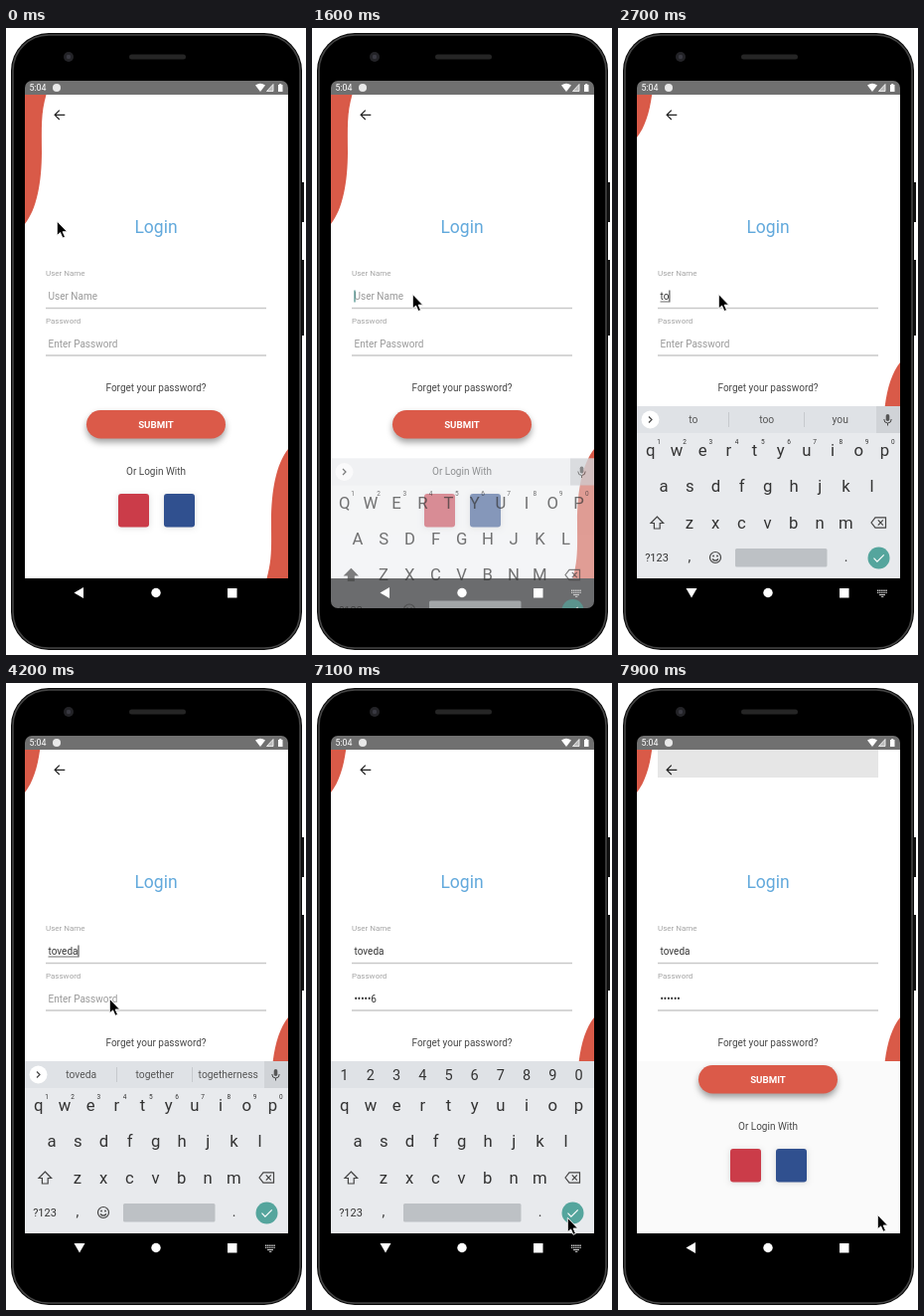
Write an HTML page that moves like this. It is 302x630 px and loops after 8000 ms.

```html
<!DOCTYPE html>
<html lang="en">
<head>
<meta charset="utf-8">
<title>Login form</title>
<style>
html, body { margin: 0; width: 100%; height: 100%; overflow: hidden; background: #fff; }
svg { display: block; width: 302px; height: 630px; font-family: Roboto, sans-serif; }
.mid { text-anchor: middle; }
.line { fill: none; stroke: #444; stroke-width: 1.2; }
</style>
</head>
<body>
<svg viewBox="0 0 302 630">
  <defs>
    <clipPath id="screen"><rect x="19" y="53" width="265" height="530" rx="7"/></clipPath>
    <clipPath id="pageClip"><rect id="pageBox" x="19" y="67" width="265" height="486"/></clipPath>
    <clipPath id="keysClip"><rect id="keysBox" x="19" y="380" width="265" height="203"/></clipPath>
    <filter id="soft" x="-30%" y="-50%" width="160%" height="220%"><feGaussianBlur stdDeviation="3"/></filter>
    <path id="blob" d="M19 67H40.5C35 86 36 100 36 124C36 155 31 182 19 197Z" fill="#d95a48"/>
  </defs>

  <!-- phone -->
  <path d="M296 155h4v40h-4zM296 233h4v76h-4z" fill="#111"/>
  <rect x="5" y="5" width="293" height="620" rx="38" fill="#0a0a0a"/>
  <rect x="7" y="7" width="289" height="616" rx="36" fill="#000" stroke="#444" stroke-width="1.6"/>
  <circle cx="63" cy="29" r="5" fill="#232327"/><circle cx="63" cy="29" r="2.2" fill="#3a3a42"/>
  <rect x="124" y="26.5" width="57" height="5" rx="2.5" fill="#252525"/>

  <g clip-path="url(#screen)">
    <!-- page -->
    <rect x="19" y="67" width="265" height="486" fill="#fafafa"/>
    <rect id="paper" x="19" y="67" width="265" height="486" fill="#fff"/>
    <rect x="19" y="53" width="265" height="14" fill="#707070"/>
    <text x="23.5" y="63" font-size="8.8" fill="#fff">5:04</text>
    <circle cx="51" cy="60" r="4" fill="#e8e8e8"/>
    <path d="M251 57.5q5-3.5 10 0l-5 6.5z" fill="#fff"/>
    <path d="M269 56.5v7h-6.5z" fill="#bbb" stroke="#fff" stroke-width=".8"/>
    <path d="M274 57h1.2v-1h2v1h1.3v7H274z" fill="#fff"/>
    <g clip-path="url(#pageClip)">
      <use id="blobA" href="#blob"/>
      <use id="blobB" href="#blob"/>
    </g>
    <rect id="focus" x="40" y="67" width="222" height="28" fill="#e6e6e6"/>
    <path d="M59.3 87.3H49.3M53.8 82.6L49.1 87.3L53.8 92" class="line" style="stroke:#222"/>
    <text x="151" y="205.5" font-size="17.5" fill="#62a9dc" class="mid">Login</text>
    <g font-size="8" fill="#a5a5a5"><text x="40" y="249">User Name</text><text x="40" y="297">Password</text></g>
    <path d="M40 281.5H262M40 329H262" stroke="#c9c9c9" stroke-width="1.3"/>
    <g font-size="10"><text id="user" x="42.5" y="273"/><text id="pass" x="42.5" y="320.5"/></g>
    <path id="under" stroke="#444" stroke-width=".8"/>
    <path id="caret" stroke-width="1.1"/>
    <g font-size="10" fill="#484848" class="mid">
      <text x="151" y="365">Forget your password?</text>
      <text x="151" y="449">Or Login With</text>
    </g>
    <g filter="url(#soft)">
      <rect x="81" y="387.5" width="140" height="29" rx="14.5" opacity=".36"/>
      <path d="M113 469h31v33h-31zM159 469h31v33h-31z" opacity=".14"/>
    </g>
    <rect x="81" y="384" width="140" height="28.5" rx="14.2" fill="#db5a49"/>
    <text x="151" y="401.7" font-size="9.7" font-weight="bold" fill="#fff" class="mid">SUBMIT</text>
    <rect x="113" y="468" width="31" height="33.5" rx="3" fill="#cb3c49"/>
    <rect x="159" y="468" width="31" height="33.5" rx="3" fill="#30508f"/>

    <!-- keyboard -->
    <g clip-path="url(#keysClip)">
      <g id="board">
        <g id="panel">
          <rect x="19" y="380" width="265" height="203" fill="#e8eaed"/>
          <rect x="19" y="380" width="265" height="27" fill="#dfe2e6"/>
        </g>
        <g id="keys"></g>
      </g>
    </g>
  </g>

  <!-- navigation bar -->
  <path id="back" fill="#fff"/>
  <circle cx="151" cy="567.5" r="4.7" fill="#fff"/>
  <rect x="223" y="563" width="9.5" height="9.5" fill="#fff"/>
  <g id="imeIcon" fill="none" stroke="#ccc">
    <path d="M261 565.2h10M261 567.4h10" stroke-width="1.4" stroke-dasharray="1.4 .7"/>
    <path d="M263 569.5h6" stroke-width="1.2"/><path d="M265 571.4h2.4" stroke-width="1"/>
  </g>

  <path id="mouse" d="M0 0V14.5L3.3 11.6L5.7 17L8.2 15.9L5.8 10.7H10.3Z" fill="#000" stroke="#fff" stroke-width=".9"/>
</svg>
<script>
const LOOP = 8000, STEP = 100;
const KEYS_IN = 1600, RESIZE = 1800, NEXT_FIELD = 4300, KEYS_OUT = 7900;
const NAME = 'toveda', DIGITS = '123456';
const nameTimes = [2400, 2700, 2900, 3000, 3100, 3200];
const digitTimes = [4900, 5300, 5700, 6000, 6200, 6400];
// time, x, y of the pointer tip
const track = [[0, 51.3, 194], [400, 51.3, 194], [1300, 101.3, 267.5], [3700, 101.3, 267.5], [4200, 104.3, 317.3],
  [4500, 105.3, 316.5], [6400, 105.3, 316.5], [7000, 257.3, 537.3], [7300, 257.3, 537.3], [7800, 261.3, 534.3], [8000, 261.3, 534.3]];

const el = id => document.getElementById(id);
const set = (id, attrs) => { for (const k in attrs) el(id).setAttribute(k, attrs[k]); };
const show = (id, on) => set(id, { visibility: on ? 'visible' : 'hidden' });
const count = (times, t) => times.filter(s => s <= t).length;

function pointer(t) {
  const i = Math.max(1, track.findIndex(p => p[0] > t));
  const [t0, x0, y0] = track[i - 1], [t1, x1, y1] = track[i];
  const p = (t - t0) / (t1 - t0), e = p * p * (3 - 2 * p);
  return [x0 + (x1 - x0) * e, y0 + (y1 - y0) * e];
}

const label = (s, x, y, size, fill = '#333') =>
  `<text class="mid" x="${x}" y="${y}" font-size="${size}" fill="${fill}">${s}</text>`;
const row = (chars, x, y, size, step = 26.2) =>
  [...chars].map((c, i) => label(c, x + i * step, y, size)).join('');

function hints(word) {
  if (!word) return ['', '', ''];
  if (word.length < 2) return [word, 'to', 'the'];
  if (word.length < 3) return [word, 'too', 'you'];
  return [word, 'together', 'togetherness'];
}

function strip(word) {
  const words = hints(word);
  return '<rect x="260" y="380" width="24" height="27" fill="#d0d3d7"/>' +
    '<circle cx="32.5" cy="393.5" r="9" fill="#fff"/><path d="M31 390.5l3 3l-3 3" class="line"/>' +
    (word ? '<path d="M111.5 386v15M187.5 386v15" stroke="#c6c9cd"/>' : '') +
    words.map((w, i) => label(w, 75.7 + 74 * i, 397.3, 10.3, '#555')).join('') +
    '<rect x="269.7" y="388" width="3.6" height="7" rx="1.8" fill="#555"/>' +
    '<path d="M267.8 393q0 4 3.7 4t3.7-4M271.5 397v2.5" class="line" style="stroke-width:1"/>';
}

function keyboard(word, secret) {
  const upper = !secret && !word;
  const letters = s => upper ? s.toUpperCase() : s;
  const left = secret ? 92 : 118;
  return (secret ? row('1234567890', 32.7, 399.3, 14.5) : strip(word) + row('1234567890', 41, 417.5, 6.5)) +
    row(letters('qwertyuiop'), 32.7, 430, 16.7) +
    row(letters('asdfghjkl'), 46, 466, 16.7) +
    row(letters('zxcvbnm'), 72, 502.5, 16.7) +
    `<path d="M39.3 491l6.3 6.5h-3.4v5.5h-5.8v-5.5h-3.4z" class="line" style="fill:${upper ? '#444' : 'none'}"/>` +
    '<path d="M255 497l4-5.2h10.5v10.4H259zM261.8 494.3l5 5.4M266.8 494.3l-5 5.4" class="line"/>' +
    label('?123', 39, 536, 11) + label(',', 72, 536, 14) + label('.', 229.5, 536, 14) +
    (secret ? '' : '<circle cx="98" cy="532" r="5.5" class="line"/><circle cx="96" cy="530.5" r=".9" fill="#444"/>' +
      '<circle cx="100" cy="530.5" r=".9" fill="#444"/><path d="M95 533.5q3 3.4 6 0" class="line"/>') +
    `<rect x="${left}" y="523" width="${210.5 - left}" height="18.5" rx="1.5" fill="#bdc1c5"/>` +
    '<circle cx="262.5" cy="532.5" r="11" fill="#55a59d"/>' +
    '<path d="M257.5 532.7l3.4 3.4l6.8-6.8" class="line" style="stroke:#fff"/>';
}

function field(id, value, hint) {
  el(id).textContent = value || hint;
  set(id, { fill: value ? '#333' : '#999' });
  return value ? el(id).getComputedTextLength() : 0;
}

function draw(t) {
  const open = t >= KEYS_IN && t < KEYS_OUT;
  const secret = t >= NEXT_FIELD;
  const small = t >= RESIZE;
  const word = NAME.slice(0, count(nameTimes, t));
  const n = count(digitTimes, t);
  const peek = n && t < digitTimes[n - 1] + 1500;
  const code = peek ? '•'.repeat(n - 1) + DIGITS[n - 1] : '•'.repeat(n);

  const rise = small ? -87 : 0;
  set('blobA', { transform: `translate(0 ${rise})` });
  set('blobB', { transform: `translate(303 ${620 + rise}) rotate(180)` });
  set('pageBox', { height: small ? 313 : 486 });
  set('paper', { height: small ? 313 : 486 });
  show('focus', t >= KEYS_OUT);

  const userW = field('user', word, 'User Name');
  const passW = field('pass', code, 'Enter Password');
  set('under', { d: `M42.5 275h${userW}` });
  show('under', word && !secret);

  const starts = [KEYS_IN, ...nameTimes, NEXT_FIELD, ...digitTimes].filter(s => s <= t);
  const since = t - starts[starts.length - 1];
  const x = 43 + (secret ? passW : userW), y = secret ? 311 : 263.5;
  set('caret', { d: `M${x} ${y}v12`, stroke: (secret ? n : word) ? '#444' : '#2f7f78' });
  show('caret', open && since % 1000 < 500);

  // the panel fades in later than its keys
  const slide = t < 1700 ? 52.5 : t < RESIZE ? 12 : 0;
  const fade = t < 1700 ? 0.68 : t < RESIZE ? 0.95 : 1;
  show('board', open);
  set('board', { transform: `translate(0 ${slide})` });
  set('panel', { opacity: fade * fade });
  set('keys', { opacity: fade });
  set('keysBox', { height: slide ? 203 : 173 });
  el('keys').innerHTML = keyboard(word, secret);

  set('back', { d: open && t >= 1700 ? 'M68.5 563h11l-5.5 9.5z' : 'M78 562v11l-9.5-5.5z' });
  show('imeIcon', open);
  set('mouse', { transform: `translate(${pointer(t).join(' ')})` });
}

let last = -1;
const begin = performance.now();
function tick() {
  const t = Math.floor((performance.now() - begin) % LOOP / STEP) * STEP;
  if (t !== last) draw(last = t);
  requestAnimationFrame(tick);
}
tick();
</script>
</body>
</html>
```
